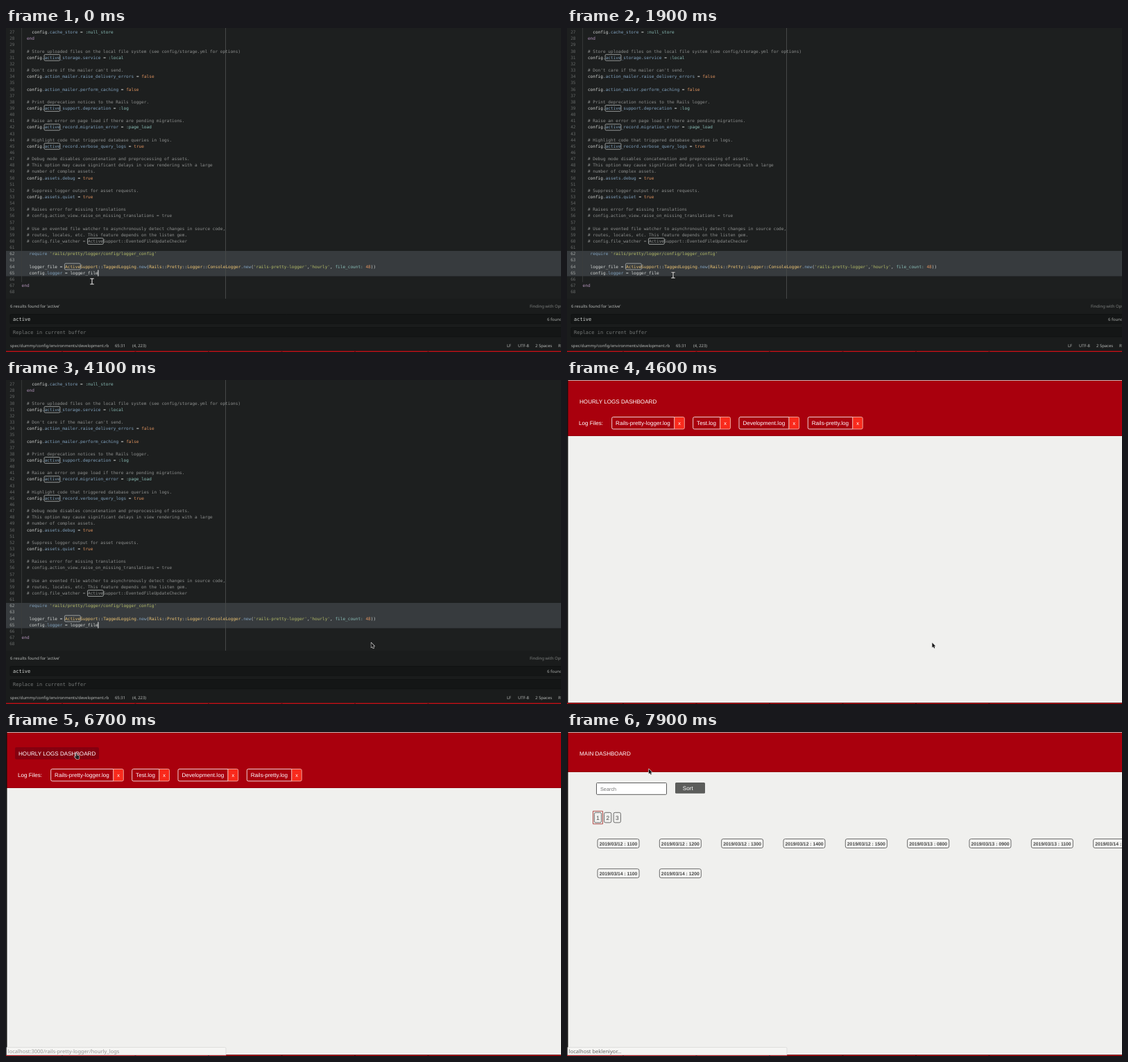
Animation of 800x468 px, one loop 8000 ms. Source, as an HTML page with a canvas:

```html
<!DOCTYPE html>
<html lang="en">
<head>
<meta charset="utf-8">
<title>Rails pretty logger demo</title>
<style>
html, body { margin: 0; width: 800px; height: 468px; overflow: hidden; background: #1d1f1f; }
canvas { display: block; }
</style>
</head>
<body>
<canvas id="stage" width="800" height="468"></canvas>
<script>
const ctx = document.getElementById('stage').getContext('2d');
const LOOP = 8000, STEP = 100;
const MONO = '"DejaVu Sans Mono", monospace';
const UI = '"Noto Sans", sans-serif';
const WEB = '"Liberation Sans", Arial, sans-serif';

const CODE = `    config.cache_store = :null_store
  end

  # Store uploaded files on the local file system (see config/storage.yml for options)
  config.active_storage.service = :local

  # Don't care if the mailer can't send.
  config.action_mailer.raise_delivery_errors = false

  config.action_mailer.perform_caching = false

  # Print deprecation notices to the Rails logger.
  config.active_support.deprecation = :log

  # Raise an error on page load if there are pending migrations.
  config.active_record.migration_error = :page_load

  # Highlight code that triggered database queries in logs.
  config.active_record.verbose_query_logs = true

  # Debug mode disables concatenation and preprocessing of assets.
  # This option may cause significant delays in view rendering with a large
  # number of complex assets.
  config.assets.debug = true

  # Suppress logger output for asset requests.
  config.assets.quiet = true

  # Raises error for missing translations
  # config.action_view.raise_on_missing_translations = true

  # Use an evented file watcher to asynchronously detect changes in source code,
  # routes, locales, etc. This feature depends on the listen gem.
  # config.file_watcher = ActiveSupport::EventedFileUpdateChecker

   require 'rails/pretty/logger/config/logger_config'

   logger_file = ActiveSupport::TaggedLogging.new(Rails::Pretty::Logger::ConsoleLogger.new('rails-pretty-logger','hourly', file_count: 48))
   config.logger = logger_file

end
`.split('\n');
const FIRST_LINE = 27, LINE_H = 9.146, CHAR_W = 3.673, CODE_X = 22.6;

// Pointer path: time, x, y
const PATH = [
  [0, 124, 366], [100, 138, 340], [300, 187, 190], [400, 165, 93], [600, 62, 200],
  [700, 38, 296], [800, 44, 330], [1100, 44, 330], [1300, 37, 326], [1500, 95, 327],
  [1700, 150, 340], [1900, 153, 357], [2200, 300, 366], [2500, 480, 377], [2700, 526, 380],
  [4000, 526, 380], [4100, 526, 379], [4800, 526, 379], [5100, 329, 199], [5200, 329, 199],
  [5700, 180, 88], [6100, 112, 34], [6700, 100, 30], [7200, 100, 30], [7700, 117.5, 53], [8000, 117.5, 53]
];

function pointerAt(t) {
  const i = PATH.findIndex(k => k[0] > t);
  const [t0, x0, y0] = PATH[i - 1], [t1, x1, y1] = PATH[i];
  const u = (t - t0) / (t1 - t0);
  return [x0 + (x1 - x0) * u, y0 + (y1 - y0) * u];
}

function rect(x, y, w, h, color) {
  ctx.fillStyle = color;
  ctx.fillRect(x, y, w, h);
}

function box(x, y, w, h, r, fill, stroke, line = 1) {
  ctx.beginPath();
  ctx.roundRect(x, y, w, h, r);
  if (fill) { ctx.fillStyle = fill; ctx.fill(); }
  if (stroke) { ctx.strokeStyle = stroke; ctx.lineWidth = line; ctx.stroke(); }
}

// y is the middle of the capitals
function text(s, x, y, size, family, color, align = 'left', weight = '') {
  ctx.font = `${weight} ${size}px ${family}`;
  ctx.textAlign = align;
  ctx.fillStyle = color;
  ctx.fillText(s, x, y + size * 0.36);
}

const TOKEN = /'[^']*'|::|:\w+|\w+:(?!:)|\.\w+|\w+|[^\w\s]/g;

function tokenColor(s) {
  if (s[0] === "'") return '#b5bd68';
  if (/^:\w|\w:$/.test(s)) return '#8abeb7';
  if (/^(true|false|\d+)$/.test(s)) return '#de935f';
  if (s === 'end') return '#b294bb';
  if (s === 'require' || /^\.\w/.test(s)) return '#81a2be';
  if (/^[A-Z]/.test(s)) return '#f0c674';
  return '#d4d7d5';
}

function drawCode() {
  CODE.forEach((line, i) => {
    const n = FIRST_LINE + i, y = 6 + i * LINE_H;
    const at = col => CODE_X + col * CHAR_W;
    text(n, 12.5, y, 6.1, MONO, n > 61 && n < 66 ? '#a0a3a2' : '#666968', 'right');
    if (line.trim()[0] === '#') {
      const col = line.indexOf('#');
      text(line.slice(col), at(col), y, 6.1, MONO, '#8e908f');
    } else {
      for (const m of line.matchAll(TOKEN)) text(m[0], at(m.index), y, 6.1, MONO, tokenColor(m[0]));
    }
    const hit = line.search(/active/i);
    if (hit >= 0) box(at(hit) - 0.6, y - 4.3, 6 * CHAR_W + 0.8, 8.9, 1.5, null, '#b4b8b6', 0.8);
  });
}

function drawEdge() {
  rect(0, 466, 800, 2, '#b3131a');
  rect(0, 466, 800, 0.6, '#3a1012');
  for (let x = 80; x < 620; x += 105.5) rect(x, 466, 2, 2, '#6d0c10');
}

function drawEditor(t) {
  rect(0, 0, 800, 468, '#1d1f1f');
  rect(0, 322, 800, 36.5, '#373b3e');
  rect(22, 0, 0.8, 367, '#3b3e3e');
  rect(316, 0, 1, 391, '#454848');
  drawCode();
  if (Math.floor((t + 100) / 400) % 2 === 0) rect(132.4, 349.5, 1, 9, '#f0f0f0');

  rect(0, 391, 800, 77, '#1a1c1c');
  text("6 results found for 'active'", 6, 402, 5.95, UI, '#b6b9b7');
  text('Finding with Options:', 755, 402, 5.95, UI, '#7c7f7e');
  box(6, 413.5, 810, 13.5, 1.5, '#141616', '#101212');
  box(6, 432.5, 810, 13.5, 1.5, '#141616', '#101212');
  text('active', 10, 420.2, 7, MONO, '#d0d3d1');
  text('6 found', 780, 420.5, 5.95, UI, '#a9acaa');
  text('Replace in current buffer', 10, 439, 7, MONO, '#747776');
  rect(0, 452, 800, 14, '#1a1c1c');
  const status = [['spec/dummy/config/environments/development.rb', 6], ['65:31', 157],
    ['(4, 223)', 182], ['LF', 722], ['UTF-8', 738], ['2 Spaces', 763], ['Ruby', 796]];
  for (const [s, x] of status) text(s, x, 459.3, 5.9, UI, '#b6b9b7');
  drawEdge();
}

function drawPage(title, headerH, hover, hoverW) {
  rect(0, 0, 800, 468, '#f0f0ee');
  rect(0, 0, 800, headerH, '#a9000d');
  rect(0, headerH - 0.7, 800, 0.7, '#8a000b');
  rect(0, 0, 800, 1, '#c0b4b4');
  rect(0, 0, 1.5, 468, '#111');
  if (hover) box(13, 22, hoverW, 17.5, 2, '#85000f');
  text(title, 18, 30.7, 8.1, WEB, '#fff');
  drawEdge();
}

function drawMain(hover) {
  drawPage('HOURLY LOGS DASHBOARD', 81, hover, 121);
  text('Log Files:', 17, 61.8, 8.1, WEB, '#fff');
  const files = [['Rails-pretty-logger.log', 64.7, 154.8, 169.3], ['Test.log', 181.7, 220.8, 235.5],
    ['Development.log', 248, 320, 334.6], ['Rails-pretty.log', 347.3, 411.8, 426.2]];
  for (const [name, x, mid, end] of files) {
    box(x, 53.5, mid - x, 17.4, [2, 0, 0, 2], null, '#f6e8e8', 0.9);
    box(mid, 53.5, end - mid, 17.4, [0, 2, 2, 0], '#f92a1c', '#f0b0a8', 0.9);
    text(name, x + 5.4, 61.9, 8.1, WEB, '#fff');
    text('x', (mid + end) / 2, 61.9, 7.4, WEB, '#fff', 'center');
  }
}

const HOURS = ['12 : 1100', '12 : 1200', '12 : 1300', '12 : 1400', '12 : 1500', '13 : 0800',
  '13 : 0900', '13 : 1100', '14 : 0900', '14 : 1000', '14 : 1100', '14 : 1200'];

function hourLabel(i) {
  if (i < HOURS.length) return HOURS[i];
  const n = i - HOURS.length;
  return `${15 + Math.floor(n / 8)} : ${String(8 + n % 8).padStart(2, '0')}00`;
}

function drawHours(count, top) {
  for (let i = 0; i < count; i++) {
    const x = 44 + (i % 10) * 89.33, y = top + Math.floor(i / 10) * 43.2;
    box(x, y, 60, 13, 2.5, '#f4f4f2', '#5c5c5c', 0.9);
    text('2019/03/' + hourLabel(i), x + 30, y + 6.6, 6.78, WEB, '#454545', 'center', 'bold');
  }
}

function drawHourly(hover, paged) {
  drawPage('MAIN DASHBOARD', 58, hover, 84);
  box(42.5, 73.5, 101, 16.8, 1, '#fff', '#5c5c5c');
  text('Search', 48, 82, 7.3, WEB, '#757575');
  box(156, 73, 43, 15.8, 1.5, '#5c5d5b');
  text('Sort', 166.8, 81.5, 8.1, WEB, '#fff');
  if (!paged) return drawHours(34, 134);
  box(37.5, 114.3, 14, 18.5, 0, null, '#a83a36', 0.9);
  [39.4, 53.6, 67.2].forEach((x, i) => {
    box(x, 116.3, 10.2, 14.6, 2, null, '#5c5c5c', 0.9);
    text(i + 1, x + 5.1, 123.6, 8.3, WEB, '#484848', 'center');
  });
  drawHours(12, 154.5);
}

function drawStatus(s, color) {
  box(1, 455.5, 316, 11, [0, 1.5, 0, 0], '#f5f5f3', '#dadad8', 0.8);
  text(s, 2.8, 461.2, 7.5, UI, color);
}

function shape(points, fill, stroke, line) {
  ctx.beginPath();
  points.forEach(([x, y]) => ctx.lineTo(x, y));
  ctx.closePath();
  ctx.strokeStyle = stroke;
  ctx.lineWidth = line;
  ctx.lineJoin = 'round';
  ctx.stroke();
  ctx.fillStyle = fill;
  ctx.fill();
}

function drawPointer(kind, x, y) {
  ctx.save();
  ctx.translate(x, y);
  if (kind === 'beam') {
    for (const [color, width] of [['#111', 2.4], ['#f2f2f2', 1.1]]) {
      ctx.strokeStyle = color;
      ctx.lineWidth = width;
      ctx.beginPath();
      ctx.moveTo(-2.8, -4); ctx.lineTo(2.8, -4);
      ctx.moveTo(0, -4); ctx.lineTo(0, 4);
      ctx.moveTo(-2.8, 4); ctx.lineTo(2.8, 4);
      ctx.stroke();
    }
  } else if (kind === 'hand') {
    shape([[0.6, 0.4], [2, 0.4], [2.2, 3.4], [5.2, 4], [5.6, 6], [5, 9], [1.6, 9], [-1.4, 5.6], [-0.8, 4.8], [0.6, 5.8]],
      '#2b2022', '#e6dcdc', 1.2);
  } else {
    shape([[0.4, 0.4], [0.4, 7.4], [2, 6], [3.2, 8.6], [4.3, 8], [3.2, 5.6], [5.2, 5.4]], '#151515', '#e8e8e8', 1.1);
  }
  ctx.restore();
}

function draw(t) {
  ctx.textRendering = 'geometricPrecision';
  const [x, y] = pointerAt(t);
  if (t < 4600) {
    drawEditor(t);
    drawPointer(t < 4100 ? 'beam' : 'arrow', x, y);
    return;
  }
  const onMain = t < 7500;
  const hover = y >= 22 && y < 39.5 && x >= 13 && x < (onMain ? 134 : 97);
  if (onMain) drawMain(hover);
  else drawHourly(hover, t >= 7900);
  if (t >= 7300) drawStatus('localhost bekleniyor…', '#686866');
  else if (t >= 6200) drawStatus('localhost:3000/rails-pretty-logger/hourly_logs', '#979795');
  drawPointer(hover ? 'hand' : 'arrow', x, y);
}

const start = performance.now();
function tick() {
  const t = (performance.now() - start) % LOOP;
  draw(Math.floor(t / STEP) * STEP);
  requestAnimationFrame(tick);
}
tick();
</script>
</body>
</html>
```
